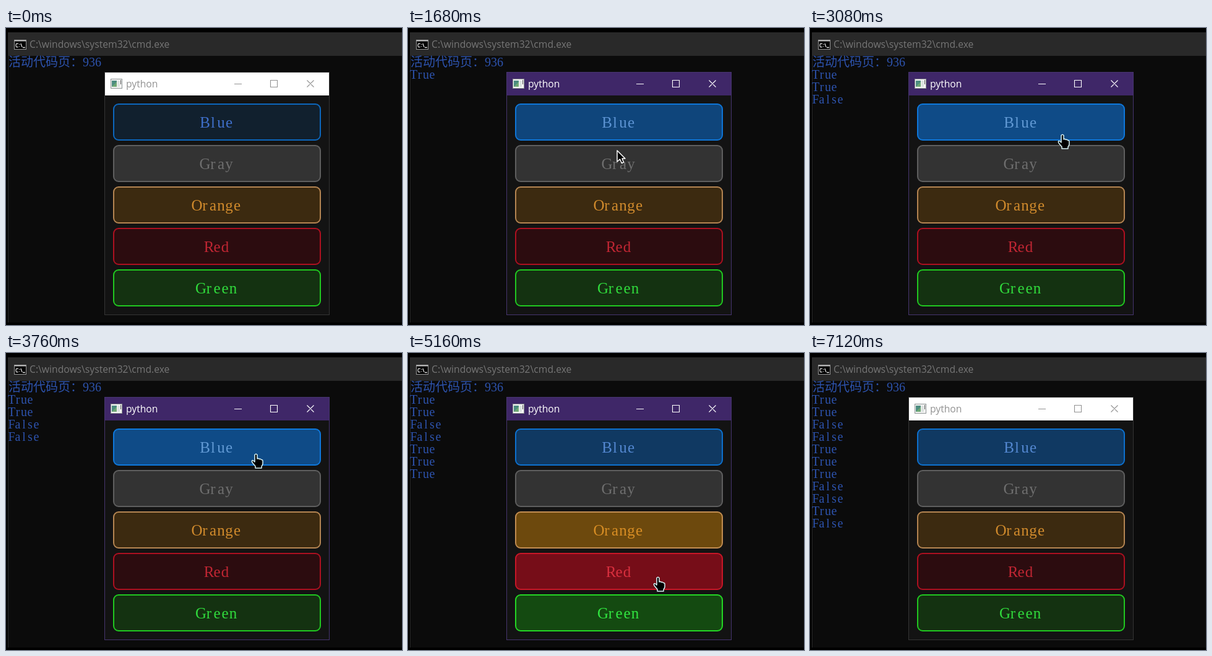
Write an HTML page that moves like this. It is 640 px wide and 480 px high and loops after 7160 ms.

```html
<!DOCTYPE html>
<html lang="zh-CN">
<head>
<meta charset="utf-8">
<title>Toggle buttons</title>
<style>
  html, body { margin: 0; width: 100%; height: 100%; overflow: hidden; background: #000; }
  svg { display: block; width: 100vw; height: 100vh; }
  .ui { font: 15.7px "Open Sans", "Noto Sans", sans-serif; }
  .cell { font-family: "Liberation Serif", "Noto Serif", serif; text-anchor: middle; }
  .cjk { font: 300 20px "Noto Sans CJK SC", "Noto Sans CJK", sans-serif; }
</style>
</head>
<body>
<svg viewBox="0 0 640 480">
  <rect x="3" y="7" width="637" height="469" fill="#0b0b0b"/>
  <path d="M3.5 7V476" stroke="#292929"/>
  <rect x="3" y="7" width="637" height="38" fill="#292929"/>
  <rect x="13.5" y="19.5" width="19" height="15" fill="#000" stroke="#999"/>
  <path d="M14 20.5H32" stroke="#bbb" stroke-width="2"/>
  <path d="M20 25.5Q16 24 16 28T20 30.5M22 26V27M22 29.5V30.5M24 25L26 31M27 31.5H31" fill="none" stroke="#ddd" stroke-width="1.3"/>
  <text class="ui" x="38" y="32" fill="#767676">C:\windows\system32\cmd.exe</text>
  <g id="console" fill="#2d53ad">
    <text class="cjk" x="4" y="62">活动代码页：</text>
  </g>

  <rect id="frame" x="159.5" y="71.5" width="363" height="392" fill="#131313"/>
  <rect id="bar" x="160" y="72" width="362" height="37"/>
  <rect x="169.5" y="82.5" width="18" height="15" fill="#f4f4f4" stroke="#8d9494"/>
  <rect x="171" y="85" width="8" height="10" fill="#4c8c80"/>
  <path d="M171 95L179 87V95Z" fill="#6fa874"/>
  <rect x="180" y="85" width="4" height="10" fill="#dce2e0"/>
  <path d="M185.5 84V91" stroke="#555"/>
  <text id="caption" class="ui" x="194" y="96">python</text>
  <path id="controls" d="M369 90.5h12M427.5 84.5h11v11h-11zM486.5 84.5l11 11m0-11l-11 11" fill="none" stroke-width="1.1"/>
  <g id="buttons"></g>
  <path id="cursor" fill="#000" stroke-width="1.5" stroke-linejoin="round"/>
</svg>
<script>
const LOOP = 7160, TICK = 40, ENTER = 840, FOCUS = 920, BLUR = 7120;
const TRAVEL = 320; // longest pointer move between two stops

// Fill, border and text colour at rest and under the pointer
const BUTTONS = [
  { name: "Blue", rest: "#11202e #0c67bd #3f6fca", hover: "#0f4b87 #0e78dc #6199d4" },
  { name: "Gray", rest: "#333333 #5f5f5f #6e6e6e", disabled: true },
  { name: "Orange", rest: "#3c2a10 #b58552 #d08a2c", hover: "#90600b #cb9250 #dc8f1e" },
  { name: "Red", rest: "#2c0c0f #ad1020 #c02633", hover: "#820d1a #cc1828 #dc3040" },
  { name: "Green", rest: "#143211 #20c820 #30da3c", hover: "#157a10 #2cf42c #34fa48" }
];

// Pointer stops: arrival time, x, y, and whether it clicks there
const CLICK = true;
const STOPS = [
  [840, 215, 92], [1080, 250, 118], [1440, 335, 156, CLICK], [1880, 345, 288, CLICK],
  [2160, 372, 490], [2280, 395, 424], [2600, 402, 288, CLICK], [3000, 408, 172],
  [3360, 405, 165, CLICK], [3840, 404, 163, CLICK], [4320, 391, 291], [4480, 390, 290, CLICK],
  [4760, 395, 354, CLICK], [5000, 400, 427], [5200, 405, 354, CLICK], [5440, 410, 290, CLICK],
  [5640, 568, 470], [5920, 414, 403, CLICK], [6200, 415, 406, CLICK], [6360, 420, 441]
];

const ARROW = "M0 0V18L4.5 14L7.5 20.5L10.5 19L8 13H13Z";
const HAND = "M-2 1.5Q0-1 2 1.5V8Q4 6.5 5.5 8.5Q7.5 7.5 8.5 9.5Q11 9 11 12V16Q10.5 18.5 9 20V23H-1V20L-6 14Q-7.5 11-5.5 10.5Q-4 10.5-2 13Z";

const $ = id => document.getElementById(id);
const mix = (a, b, u) => a + (b - a) * u;
const rowTop = i => 123 + i * 67;

function set(el, attrs) {
  for (const key in attrs) el.setAttribute(key, attrs[key]);
}

function add(parent, tag, attrs) {
  const el = document.createElementNS("http://www.w3.org/2000/svg", tag);
  set(el, attrs);
  return parent.appendChild(el);
}

// Fixed-pitch text, each glyph centred in its cell
function cells(parent, str, left, y, pitch, size) {
  const x = [...str].map((_, i) => left + (i + 0.5) * pitch).join(" ");
  const el = add(parent, "text", { class: "cell", x, y, "font-size": size });
  el.textContent = str;
  return el;
}

// "#rrggbb #rrggbb ..." to one flat list of channels
const channels = str => str.match(/\w\w/g).map(h => parseInt(h, 16));

function buttonAt(x, y) {
  if (x < 173 || x > 509) return -1;
  return BUTTONS.findIndex((b, i) => !b.disabled && Math.abs(y - rowTop(i) - 29) <= 30);
}

BUTTONS.forEach((b, i) => {
  b.rest = channels(b.rest);
  b.hover = b.hover ? channels(b.hover) : b.rest;
  b.checked = b.rest.map((c, k) => mix(c, b.hover[k], 0.58));
  b.rect = add($("buttons"), "rect", { x: 174, y: rowTop(i), width: 334, height: 58, rx: 8, "stroke-width": 2 });
  b.label = cells($("buttons"), b.name, 341 - b.name.length * 6.5, rowTop(i) + 38, 13, 25);
});

cells($("console"), "936", 124, 62, 10, 20);
const clicks = STOPS.filter(s => s[3]).map(([time, x, y]) => ({ time, button: buttonAt(x, y) }));
const isChecked = (i, t) => clicks.filter(c => c.button === i && c.time <= t).length % 2 === 1;
clicks.forEach((c, row) => {
  const word = isChecked(c.button, c.time) ? "True" : "False";
  c.line = cells($("console"), word, 4, 82 + row * 20, 10, 20);
});

function pointer(t) {
  const away = t >= 2160 && t < 2280;
  if (t < ENTER || t >= BLUR || away) return null;
  const next = STOPS.findIndex(s => s[0] > t);
  if (next < 0) return STOPS[STOPS.length - 1].slice(1, 3);
  const [t0, x0, y0] = STOPS[next - 1], [t1, x1, y1] = STOPS[next];
  const u = Math.max(0, 1 - (t1 - t) / Math.min(TRAVEL, t1 - t0));
  const ease = u * u * (3 - 2 * u);
  return [mix(x0, x1, ease), mix(y0, y1, ease)];
}

function hovered(t) {
  const p = pointer(t);
  return p ? buttonAt(...p) : -1;
}

function look(i, t) {
  const b = BUTTONS[i];
  if (hovered(t) === i) return b.hover;
  return isChecked(i, t) ? b.checked : b.rest;
}

// Short fade: mean of the last three ticks
function colours(i, t) {
  const past = [0, 1, 2].map(k => look(i, t >= BLUR ? t : t - k * TICK));
  const mean = past[0].map((_, k) => Math.round((past[0][k] + past[1][k] + past[2][k]) / 3));
  return [0, 3, 6].map(k => `rgb(${mean.slice(k, k + 3)})`);
}

function render(t) {
  const active = t >= FOCUS && t < BLUR;
  const ink = active ? "#fff" : "#929292";
  set($("frame"), { stroke: active ? "#46356f" : "#353535" });
  set($("bar"), { fill: active ? "#3f2768" : "#fff" });
  set($("caption"), { fill: ink });
  set($("controls"), { stroke: ink });

  BUTTONS.forEach((b, i) => {
    const [fill, stroke, text] = colours(i, t);
    set(b.rect, { fill, stroke });
    set(b.label, { fill: text });
  });
  clicks.forEach(c => set(c.line, { visibility: t >= c.time ? "visible" : "hidden" }));

  const p = pointer(t);
  set($("cursor"), { visibility: p ? "visible" : "hidden" });
  if (p) {
    const hand = hovered(t) >= 0;
    set($("cursor"), {
      d: hand ? HAND : ARROW,
      stroke: hand ? "#d8f4f8" : "#fff",
      transform: `translate(${p.map(Math.round)})`
    });
  }
}

const start = performance.now();
function loop() {
  const t = Math.max(0, performance.now() - start) % LOOP;
  render(Math.floor(t / TICK) * TICK);
  requestAnimationFrame(loop);
}
loop();
</script>
</body>
</html>
```
